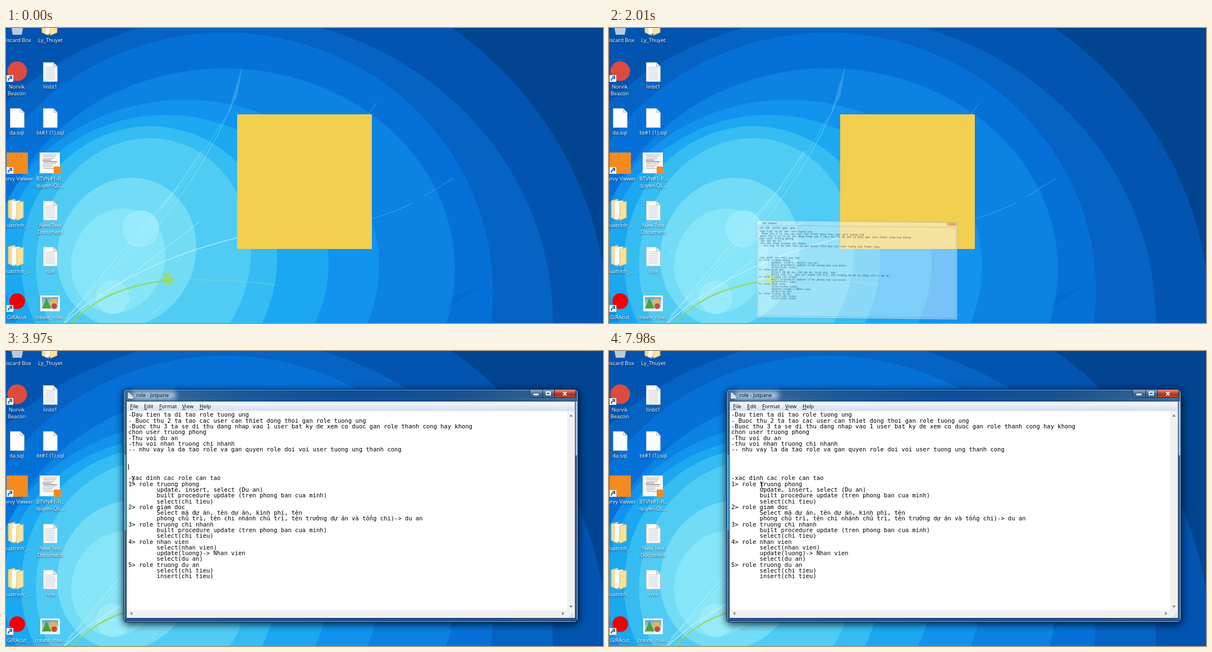
An HTML page with a canvas for the animation above (8000 ms loop, 1064 by 526 pixels).

```html
<!DOCTYPE html>
<html lang="en">
<head>
<meta charset="utf-8">
<title>Desktop</title>
<style>
html, body { margin: 0; width: 100%; height: 100%; overflow: hidden; background: #0355b0; }
canvas { display: block; }
</style>
</head>
<body>
<canvas id="stage" width="1064" height="526"></canvas>
<script>
const c = document.getElementById('stage').getContext('2d');
const UI = '9.4px "Open Sans", "Noto Sans", sans-serif';
const MONO = '10.51px "DejaVu Sans Mono", monospace';
const CHAR = 6.327, LINE = 10.28, LEFT = 218, TOP = 117.4;
const LOOP = 8000;

const note = `-Dau tien ta di tao role tuong ung
- Buoc thu 2 ta tao cac user can thiet dong thoi gan role tuong ung
-Buoc thu 3 ta se di thu dang nhap vao 1 user bat ky de xem co duoc gan role thanh cong hay khong
chon user truong phong
-Thu voi du an
-thu voi nhan truong chi nhanh
-- nhu vay la da tao role va gan quyen role doi voi user tuong ung thanh cong




-xac dinh cac role can tao
1> role truong phong
        update, insert, select (Du an)
        built procedure update (tren phong ban cua minh)
        select(chi tieu)
2> role giam doc
        Select mã dự án, tên dự án, kinh phí, tên
        phòng chủ trì, tên chi nhánh chủ trì, tên trưởng dự án và tổng chi)-> du an
3> role truong chi nhanh
        built procedure update (tren phong ban cua minh)
        select(chi tieu)
4> role nhan vien
        select(nhan vien)
        update(luong)-> Nhan vien
        select(du an)
5> role truong du an
        select(chi tieu)
        insert(chi tieu)`.split('\n');

function rect(x, y, w, h, fill) {
  c.fillStyle = fill;
  c.fillRect(x, y, w, h);
}
function round(x, y, w, h, r, fill, stroke) {
  c.beginPath();
  c.roundRect(x, y, w, h, r);
  paint(fill, stroke);
}
function disc(x, y, r, fill) {
  c.beginPath();
  c.arc(x, y, r, 0, 7);
  paint(fill);
}
function poly(points, fill, stroke) {
  c.beginPath();
  points.forEach(([x, y]) => c.lineTo(x, y));
  c.closePath();
  paint(fill, stroke);
}
function paint(fill, stroke) {
  if (fill) { c.fillStyle = fill; c.fill(); }
  if (stroke) { c.strokeStyle = stroke; c.stroke(); }
}
function curve(d, color, width = 1) {
  c.lineWidth = width;
  c.strokeStyle = color;
  c.stroke(new Path2D(d));
  c.lineWidth = 1;
}
function text(s, x, y, color = '#000', font = UI, align = 'left') {
  c.font = font;
  c.fillStyle = color;
  c.textAlign = align;
  c.fillText(s, x, y);
}
function fade(x0, y0, x1, y1, ...colors) {
  const g = c.createLinearGradient(x0, y0, x1, y1);
  colors.forEach((k, i) => g.addColorStop(i / (colors.length - 1), k));
  return g;
}

// Wallpaper: nested colour bands as cx, cy, rx, ry, turn
const bands = [
  [400, 526, 672, 650, 0, '#0254b0'],
  [400, 526, 575, 548, 0, '#0563c3'],
  [390, 470, 478, 462, 0, '#0571d8'],
  [390, 430, 410, 358, 0, '#0c82e2'],
  [320, 425, 345, 297, 0, '#1193ee'],
  [285, 420, 290, 265, 0, '#1ba8f1'],
  [255, 415, 228, 240, .1, '#34bcf3'],
  [245, 410, 190, 215, .25, '#50ccf4'],
  [215, 400, 122, 135, .4, '#72dcf6'],
  [200, 415, 82, 95, .4, '#86e5f8']
];
function wallpaper() {
  rect(0, 0, 1064, 526, '#014490');
  for (const [x, y, rx, ry, turn, color] of bands) {
    c.beginPath();
    c.ellipse(x, y, rx, ry, turn, 0, 7);
    paint(color);
  }
  disc(240, 358, 33, '#98ebfa');
  disc(190, 480, 30, '#98ebfa');
  poly([[786, 500], [846, 460], [800, 478]], 'rgba(0,85,190,.25)');
  poly([[396, 150], [422, 64], [412, 122]], 'rgba(100,195,245,.4)');
  const pale = 'rgba(210,247,255,.7)';
  curve('M105 526Q310 345 402 140', 'rgba(190,240,255,.5)');
  curve('M105 520Q260 385 390 160', 'rgba(190,240,255,.35)');
  curve('M110 512Q230 400 350 218', 'rgba(190,240,255,.3)', 2);
  curve('M104 524Q190 415 308 282', pale);
  curve('M104 526Q220 420 420 372', pale, 1.4);
  curve('M130 510Q250 420 345 345', pale);
  curve('M620 350Q690 330 725 312M745 300L797 268M612 198L660 134', 'rgba(90,195,250,.6)');
  curve('M118 526Q185 450 300 449T480 458', 'rgba(155,224,170,.6)');
  curve('M118 526Q175 460 300 449', '#91d84c', 1.8);
  for (let i = 0; i < 6; i++) {
    c.beginPath();
    c.ellipse(288 + 6 * Math.cos(i), 447 + 8 * Math.sin(i), 6, 1.6, i, 0, 7);
    paint('#a5d94a');
  }
  for (let i = 0; i < 18; i++) {
    rect(110 + i * 83 % 210, 400 + i * 47 % 115, 1.5, 1.5, 'rgba(225,250,255,.7)');
  }
  rect(412, 154, 240, 240, '#f3cf50');
}

// Desktop icons
function label(x, y, ...lines) {
  c.shadowColor = '#001b3b';
  c.shadowBlur = 3;
  c.shadowOffsetY = 1;
  lines.forEach((s, i) => text(s, x, y + i * 12, '#fff', UI, 'center'));
  c.shadowColor = 'transparent';
  c.shadowBlur = c.shadowOffsetY = 0;
}
function page(x, y, rows = 0, w = 25, h = 34) {
  poly([[x, y], [x + w - 7, y], [x + w, y + 7], [x + w, y + h], [x, y + h]], '#fbfcfd', '#b4bfc9');
  poly([[x + w - 7, y], [x + w, y + 7], [x + w - 7, y + 7]], '#e3e8ed', '#b4bfc9');
  for (let i = 0; i < rows; i++) rect(x + 4, y + 8 + i * 3, w - 8, 1, '#c0c8d0');
}
function folder(x, y) {
  poly([[x, y + 3], [x + 12, y], [x + 12, y + 38], [x, y + 33]], '#f3dc98', '#dcb962');
  poly([[x + 6, y + 4], [x + 21, y + 3], [x + 21, y + 34], [x + 6, y + 36]], '#fcfcf8', '#d5d8d0');
  poly([[x + 15, y + 7], [x + 27, y + 4], [x + 27, y + 33], [x + 15, y + 38]], '#f6e3a0', '#dcbb64');
}
function shortcut(y) {
  rect(1, y, 12, 12, '#f5f7fa');
  curve(`M4 ${y + 10}Q4 ${y + 5} 9 ${y + 5}M6 ${y + 2.5}H10V${y + 7}`, '#1b63b5', 2);
}
function icons() {
  poly([[8, -10], [32, -10], [28, 12], [12, 12]], '#bccbd8');
  folder(64, -25);
  disc(20, 77, 17.5, '#dd4b3e');
  page(66.5, 61.5, 8);
  page(7.5, 143.5);
  page(66.5, 143.5);
  rect(1, 222, 38, 38, '#f58a1f');
  rect(60, 222, 36, 37, '#f8f8f8');
  for (let i = 0; i < 9; i++) rect(65 + i % 3, 226 + i * 3, 25 - i % 4 * 3, 1, i > 2 && i < 5 ? '#555' : '#a9a9ae');
  rect(85, 247, 13, 13, '#f58a1f');
  folder(4, 305);
  folder(4, 387);
  page(66.5, 308.5, 8);
  page(66.5, 390.5, 8);
  disc(20, 487, 14, '#f00000');
  rect(61, 477, 35, 28, '#f7f7f2');
  rect(64, 480, 29, 22, fade(0, 480, 0, 502, '#5ea5e0', '#d9eefa'));
  rect(79, 483, 11, 13, '#e8b54a');
  poly([[72, 481], [81, 500], [64, 500]], '#49a33c');
  disc(86, 496, 5, '#c74b3b');
  [84, 248, 494].forEach(shortcut);

  label(19, 25, 'Discard Box');
  label(79, 25, 'Ly_Thuyet');
  label(19, 108, 'Norvik', 'Beacon');
  label(79, 108, 'linbt1');
  label(19, 190, 'da.sql');
  label(79, 190, 'bt#1 (1).sql');
  label(19, 272, 'Dorvy Viewer');
  label(79, 272, 'BTVN#1-P...', 'quyen-QL...');
  label(19, 355, 'Quatrinh_...');
  label(79, 355, 'New Text', 'Document');
  label(19, 437, 'Quatrinh_...');
  label(79, 437, 'role');
  label(19, 519, 'GIRAcut');
  label(79, 519, 'create_role...');
}

// Taskbar preview
function preview() {
  c.shadowColor = 'rgba(0,20,50,.7)';
  c.shadowBlur = 8;
  round(164.5, 412.5, 185, 125, 5, fade(164, 412, 350, 526, '#5c8fac', '#3f7ea5', '#155c99', '#3a87b8'), '#14334d');
  c.shadowBlur = 0;
  c.shadowColor = 'transparent';
  round(165.5, 413.5, 183, 125, 4, null, 'rgba(190,225,245,.75)');
  disc(183, 432, 5.5, '#a9b3b8');
  text('Tandro SQL Composer : KH30481...', 195, 436, '#fff', '9px "Open Sans", sans-serif');
  rect(176, 442, 160, 82, '#16344e');
  rect(177, 443, 158, 80, '#fcfdff');
  rect(177, 443, 158, 8, '#dde6f2');
  rect(177, 451, 32, 69, '#eef2f8');
  rect(209, 451, 1, 69, '#66809c');
  rect(281, 451, 1, 56, '#66809c');
  rect(210, 453, 70, 5, '#cbdcf0');
  rect(212, 462, 68, 2.5, '#2a5d98');
  rect(210, 480, 71, 5, '#dbe6f2');
  rect(210, 505, 125, 4, '#bdd0e5');
  rect(177, 519, 158, 4, '#bdd0e5');
  for (let i = 0; i < 20; i++) {
    rect(179 + i % 3 * 2, 453 + i * 3.2, 8 + i * 7 % 11, 1, '#7b8997');
    if (i < 14) rect(285, 454 + i * 3.5, 12 + i * 13 % 31, 1, '#a3acb8');
    if (i < 6) {
      rect(214, 487 + i * 2.8, 15 + i * 5 % 12, 1, '#8995a5');
      rect(248, 487 + i * 2.8, 14, 1, '#abb3be');
    }
    rect(180 + i * 7.3, 446, 4, 2, '#8795a8');
  }
}

// Text window
function noteLine(i, color) {
  text(note[i], LEFT, TOP + i * LINE, color, MONO);
}
function titleAndMenu() {
  text('role - Jotpane', 232, 82);
  [['File', 221], ['Edit', 246], ['Format', 273], ['View', 314], ['Help', 345]].forEach(([s, x]) => {
    text(s, x, 102);
    rect(x, 103.5, c.measureText(s[0]).width, 1, '#000');
  });
}
function editor(selected, caret) {
  c.shadowColor = 'rgba(0,5,25,.85)';
  c.shadowBlur = 14;
  c.shadowOffsetY = 3;
  round(209.5, 68.5, 810, 415, 6, fade(209, 68, 1020, 90, '#44719f', '#1d5c9d', '#0d519f', '#1a5695', '#416c99'), '#071a33');
  c.shadowColor = 'transparent';
  c.shadowBlur = c.shadowOffsetY = 0;
  round(210.5, 69.5, 808, 413, 5, null, 'rgba(150,205,240,.75)');
  rect(211, 185, 3, 135, '#3aa6e4');
  rect(1015, 90, 3, 96, '#9cc3de');
  rect(212, 478, 806, 4, '#1a5594');

  c.filter = 'blur(5px)';
  rect(226, 72, 76, 14, 'rgba(205,228,245,.8)');
  c.filter = 'none';
  page(217.5, 74.5, 1, 9, 10);

  round(933.5, 68.5, 82, 14, [0, 0, 4, 4], fade(0, 69, 0, 83, '#92acc6', '#5f81a6', '#335b8a', '#587fa9'), '#15304e');
  round(977.5, 68.5, 38, 14, [0, 0, 4, 0], fade(0, 69, 0, 83, '#df9e8e', '#c8553f', '#a82a16', '#d3664a'), '#4d1510');
  rect(956, 69, 1, 13, '#15304e');
  rect(940, 76, 9, 3, '#fff');
  curve('M963 73h7v5h-7zM993 73L999 79M999 73L993 79', '#fff', 2);

  rect(214, 89, 801, 388, '#0d2b4d');
  rect(215, 90, 799, 386, '#f0f0f0');
  rect(215, 90, 799, 17, fade(0, 90, 0, 107, '#ffffff', '#e4eaf5', '#d8e0f0'));
  titleAndMenu();
  rect(215, 107, 785, 355, '#fff');
  poly([[1004, 117], [1007, 113], [1010, 117]], '#858585');
  poly([[1004, 454], [1007, 458], [1010, 454]], '#858585');
  poly([[225, 465], [221, 468], [225, 471]], '#858585');
  poly([[991, 465], [995, 468], [991, 471]], '#858585');
  for (let i = 0; i < 3; i++) {
    for (let j = 0; j <= i; j++) rect(1010 - j * 3, 467 + i * 3, 1.5, 1.5, '#b5b5b5');
  }

  note.forEach((s, i) => noteLine(i, '#000'));
  if (selected) {
    c.save();
    c.beginPath();
    c.rect(LEFT + CHAR, 222, selected * CHAR, 10.5);
    c.clip();
    rect(LEFT, 220, 200, 15, '#3399ff');
    noteLine(11, '#fff');
    c.restore();
  }
  if (caret) rect(218, 202, 1, 10, '#000');
}
// See-through window while it opens
function opening(x, y, w, h, tilt, alpha) {
  c.save();
  c.transform(w / 810, tilt / 810, 0, h / 416, x, y);
  c.translate(-209, -68);
  c.globalAlpha = alpha;
  round(209, 68, 810, 416, 6, '#f4faff', '#0a4b80');
  round(214, 89, 801, 388, 0, null, '#0a4b80');
  rect(977, 69, 38, 13, '#d8583c');
  c.globalAlpha = Math.min(1, alpha * 1.7);
  titleAndMenu();
  note.forEach((s, i) => noteLine(i, '#0b2a48'));
  c.restore();
}

// Pointer moves: start, end, number of steps, path
const moves = [
  [2470, 3370, 7, [[237, 489], [240, 506], [308, 380], [207, 219]]],
  [3520, 3970, 4, [[207, 219], [226, 229]]],
  [4280, 5260, 8, [[226, 229], [382, 229]]],
  [5410, 6310, 7, [[382, 229], [227, 230], [322, 230]]],
  [6460, 6610, 2, [[322, 230], [387, 226]]],
  [6920, 7070, 2, [[387, 226], [451, 219]]],
  [7380, 7980, 5, [[451, 219], [209, 250], [272, 239]]]
];
function pointerAt(t) {
  const move = moves.findLast(m => t >= m[0]);
  if (!move) return moves[0][3][0];
  const [start, end, steps, path] = move;
  const step = Math.min(steps, 1 + Math.floor((t - start) / (end - start) * (steps - 1) + 1e-6));
  const p = step / steps * (path.length - 1);
  const i = Math.min(Math.floor(p), path.length - 2);
  return path[i].map((v, k) => v + (path[i + 1][k] - v) * (p - i));
}
function pointer(x, y) {
  x = Math.round(x);
  y = Math.round(y);
  if (x > 215 && x < 1000 && y > 107 && y < 462) {
    curve(`M${x - 2.5} ${y - 5.5}h2M${x + 1.5} ${y - 5.5}h2M${x + .5} ${y - 5}v11M${x - 2.5} ${y + 6.5}h2M${x + 1.5} ${y + 6.5}h2`, '#000');
  } else {
    const shape = [[0, 0], [0, 13], [3, 10], [5, 15], [7, 14], [5, 9.5], [9, 9]];
    poly(shape.map(([dx, dy]) => [x + .5 + dx, y + dy]), '#fff', '#000');
  }
}

function draw(t) {
  wallpaper();
  icons();
  if (t >= 930 && t < 1710) preview();
  if (t >= 1860 && t < 2010) opening(272, 408, 270, 112, 5, .15);
  if (t >= 2010 && t < 2160) opening(263, 343, 358, 173, 4, .45);
  if (t < 2160) return;
  const [x, y] = pointerAt(t);
  const dragging = t >= 4280 && t < 7380;
  const selected = dragging ? Math.max(0, Math.min(25, Math.round((x - LEFT) / CHAR - 1))) : 0;
  editor(selected, t < 4280 && !(t >= 2920 && t < 3520));
  pointer(x, y);
}
function frame() {
  draw(performance.now() % LOOP);
  requestAnimationFrame(frame);
}
frame();
</script>
</body>
</html>
```
